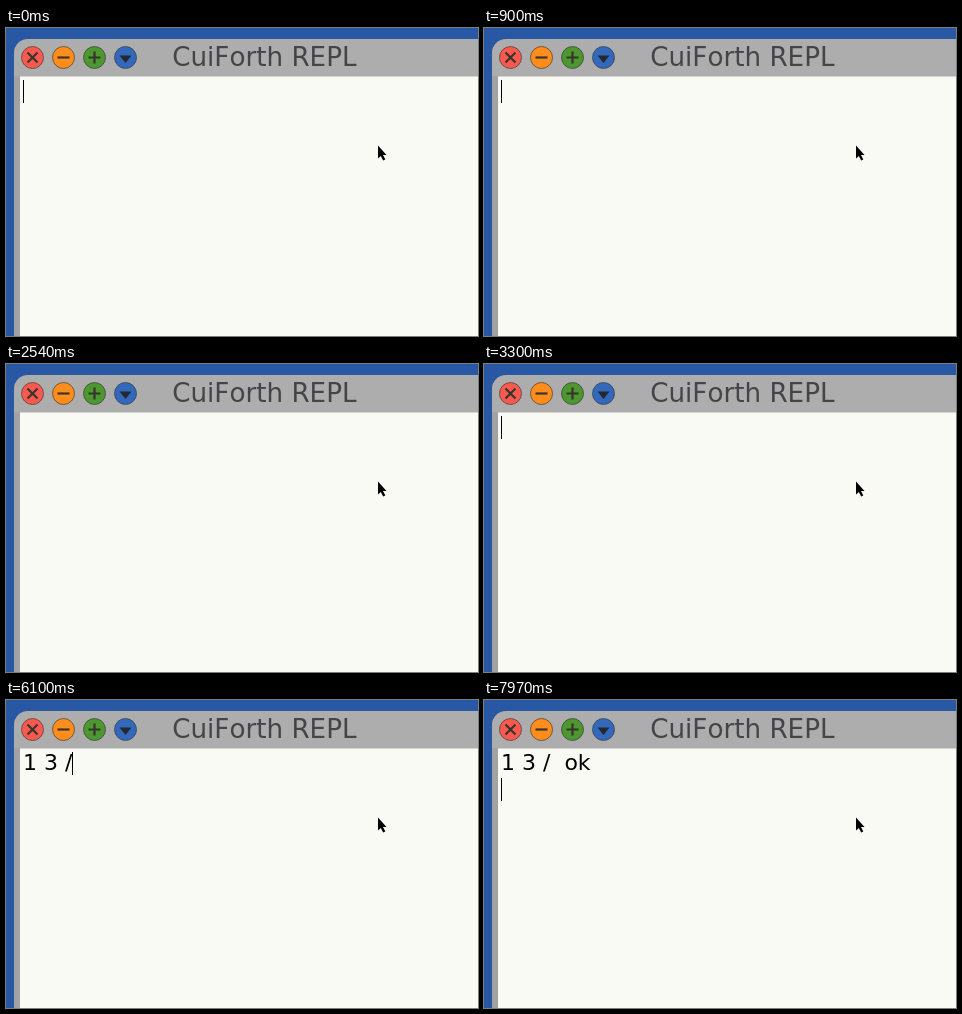
Write an HTML page that moves like this. It is 472x308 px and loops after 8000 ms.

```html
<!DOCTYPE html>
<html lang="en">
<head>
<meta charset="utf-8">
<title>CuiForth REPL</title>
<style>
  html, body { margin: 0; width: 100%; height: 100%; overflow: hidden; background: #2857a3; }
  svg { display: block; width: 100%; height: 100%; }
  text { font-family: "DejaVu Sans", sans-serif; font-kerning: none; white-space: pre; }
</style>
</head>
<body>
<svg viewBox="0 0 472 308">
  <rect width="472" height="308" fill="#2857a3"/>
  <path d="M8 308V25A14 14 0 0 1 22 11H472V308Z" fill="#adadad"/>
  <rect x="8" y="48" width="6" height="260" fill="#a2a2a2"/>
  <rect x="14" y="48.500" width="458" height="260" fill="#fafaf4"/>
  <g id="buttons"></g>
  <text x="166.200" y="37.500" font-size="26.200" fill="#454548">CuiForth REPL</text>
  <text id="line" x="17" y="70" font-size="22" fill="#000"></text>
  <rect id="caret" x="17" y="52" width="1" height="23" fill="#000"/>
  <path d="M372 117.500V130.500L374.800 128L377.200 132.500L379.300 131.500L377 127H380.500Z" fill="#000"/>
</svg>
<script>
const LOOP = 8000;
const LEFT = 17, TOP = 52, LINE_HEIGHT = 26, SIZE = 22;
const BLINK = 505, FIRST_BLINK = 300;

// Advance widths in em, used to place the caret.
const ADVANCE = { "1": 0.636, "3": 0.636, " ": 0.318, "/": 0.337 };

// Each key press: time in ms and the text after it.
const KEYS = [
  [-300, ""], [4200, "1"], [4620, "1 "], [5150, "1 3"],
  [5450, "1 3 "], [5800, "1 3 /"], [6550, "1 3 /  ok\n"]
];

// Icons are drawn around the centre of their button.
const BUTTONS = [
  ["#f9594f", "M-5 -5L5 5M5 -5L-5 5"],
  ["#ff8d1c", "M-6 0H6"],
  ["#4c9730", "M-6 0H6M0 -6V6"],
  ["#3369bd", "M-6 -2H6L0 5.500Z"]
];

const line = document.getElementById("line");
const caret = document.getElementById("caret");

document.getElementById("buttons").innerHTML = BUTTONS.map(([color, icon], i) =>
  `<g transform="translate(${26.5 + 31 * i} 29.500)">` +
  `<circle r="11" fill="${color}" stroke="#3c3c3c" stroke-opacity=".7"/>` +
  (icon.endsWith("Z")
    ? `<path d="${icon}" fill="#26282e"/>`
    : `<path d="${icon}" stroke="#38342c" stroke-width="2.200"/>`) +
  "</g>"
).join("");

const widthOf = text => [...text].reduce((sum, c) => sum + ADVANCE[c] * SIZE, 0);
const blinkIndex = t => Math.floor((t - FIRST_BLINK) / BLINK);

function draw(t) {
  const [pressed, typed] = KEYS.filter(([at]) => at <= t).pop();
  const rows = typed.split("\n");
  const row = rows.length - 1;
  line.textContent = rows[0];
  caret.setAttribute("x", Math.round(LEFT + widthOf(rows[row])));
  caret.setAttribute("y", TOP + row * LINE_HEIGHT);

  // A key press shows the caret and skips the next blink.
  const blinks = blinkIndex(t) - blinkIndex(pressed);
  const shown = blinks === 0 || blinks % 2 === 1;
  caret.setAttribute("visibility", shown ? "visible" : "hidden");
}

const start = performance.now();
function tick() {
  draw((performance.now() - start) % LOOP);
  requestAnimationFrame(tick);
}
draw(0);
requestAnimationFrame(tick);
</script>
</body>
</html>
```
